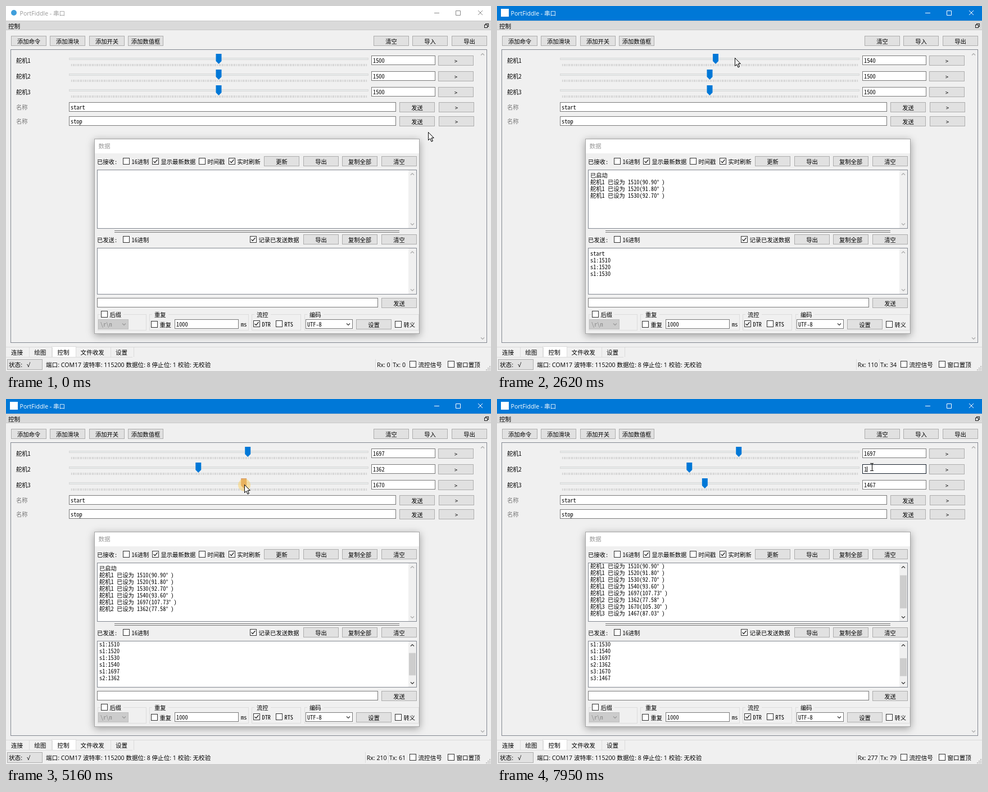
An HTML page with a canvas for the animation above (8000 ms loop, 863 px wide and 649 px high).

```html
<!DOCTYPE html>
<html lang="zh-CN">
<head>
<meta charset="utf-8">
<title>PortFiddle</title>
<style>
html, body { margin: 0; width: 100%; height: 100%; overflow: hidden; background: #f0f0f0; }
canvas { display: block; }
</style>
</head>
<body>
<canvas id="stage" width="863" height="649"></canvas>
<script>
const ctx = document.getElementById('stage').getContext('2d');
const LOOP = 8000, TICK = 81.8;
const MONO = '10.3px "Noto Sans Mono CJK SC", "Noto Sans CJK SC", monospace';
const UI = '10.6px "Open Sans", "Noto Sans CJK SC", sans-serif';
const BLUE = '#0078d7';
const PX_PER_UNIT = 0.2625;

// Events run from one step until another; a press lasts `hold` steps longer.
const move = (from, until, x, y) => ({ from, until, x, y });
const press = (from, hold) => ({ from, until: from, hold });
const drag = (from, until, servo, value) => ({ from, until, hold: 2, servo, value });
const pageClick = (_, i) => ({ ...press(22 + 3 * i, 1), servo: 0, value: 1510 + 10 * i });
const EVENTS = [
  move(1, 6, 735, 181), press(8, 1),
  move(11, 17, 311, 99), move(17, 19, 407, 97), move(19, 21, 423, 93),
  ...Array.from({ length: 4 }, pageClick),
  move(33, 36, 391, 94), drag(37, 41, 0, 1697),
  move(43, 46, 377, 119), drag(50, 52, 1, 1362),
  move(54, 56, 370, 142), move(56, 59, 379, 153), drag(60, 63, 2, 1670), drag(69, 72, 2, 1467),
  move(75, 79, 690, 126), move(80, 84, 661, 116), press(84, 2), move(86, 88, 667, 121)
];
const MESSAGES = [
  { at: 9, sent: 'start', reply: '已启动', rx: 11 },
  ...EVENTS.filter(e => e.value).map(({ until, hold, servo, value }) => {
    const angle = ((value - 500) * 0.09).toFixed(2);
    return {
      at: until + hold + 1,
      sent: `s${servo + 1}:${value}`,
      reply: `舵机${servo + 1} 已设为 ${value}(${angle}° )`,
      rx: 28 + angle.length
    };
  })
];

function stateAt(k) {
  const state = { x: 751, y: 225, down: false, values: [1500, 1500, 1500] };
  for (const e of EVENTS) {
    if (k < e.from) break;
    const f = e.until > e.from ? Math.min(1, (k - e.from) / (e.until - e.from)) : 1;
    if (e.x) {
      state.x += (e.x - state.x) * f;
      state.y += (e.y - state.y) * f;
    }
    if (e.value) {
      const delta = (e.value - state.values[e.servo]) * f ** 2.35;
      state.values[e.servo] += delta;
      if (e.until > e.from) state.x += delta * PX_PER_UNIT;
    }
    if (e.hold) state.down = k < e.until + e.hold;
  }
  state.x = Math.round(state.x);
  state.y = Math.round(state.y);
  return state;
}

function rect(x, y, w, h, fill) {
  ctx.fillStyle = fill;
  ctx.fillRect(x, y, w, h);
}
function box(x, y, w, h, fill, border) {
  rect(x, y, w, h, border);
  rect(x + 1, y + 1, w - 2, h - 2, fill);
}
function disc(x, y, r, fill) {
  ctx.fillStyle = fill;
  ctx.beginPath();
  ctx.arc(x, y, r, 0, 7);
  ctx.fill();
}
function text(s, x, y, { font = MONO, color = '#000', align = 'left' } = {}) {
  ctx.font = font;
  ctx.fillStyle = color;
  ctx.textAlign = align;
  ctx.fillText(s, x, y + 4);
}
function line(points, color, width = 1, close = false) {
  ctx.beginPath();
  points.forEach(([x, y]) => ctx.lineTo(x, y));
  if (close) ctx.closePath();
  ctx.strokeStyle = color;
  ctx.lineWidth = width;
  ctx.stroke();
}
function chevron(x, y, dir, color) {
  line([[x - 3, y - 1.5 * dir], [x, y + 1.5 * dir], [x + 3, y - 1.5 * dir]], color, 1.2);
}

let mouse;
const over = (x, y, w, h) => mouse.x >= x && mouse.x < x + w && mouse.y >= y && mouse.y < y + h;

function button(label, x, y, w = 63) {
  const hot = over(x, y, w, 18);
  const [fill, border] = !hot ? ['#e1e1e1', '#adadad'] : mouse.down ? ['#cce4f7', '#005499'] : ['#e5f1fb', BLUE];
  box(x, y, w, 18, fill, border);
  text(label, x + w / 2, y + 9.5, { align: 'center' });
}
function buttonRow(labels, x, y) {
  labels.forEach((s, i) => button(s, Math.round(x + i * 69.5), y));
}
function edit(value, x, y, w, focus = false) {
  box(x, y, w, 17, '#fff', focus ? '#17212d' : over(x, y, w, 17) ? '#171717' : '#7a7a7a');
  text(value, x + 3, y + 9);
}
function check(label, x, y, on = false, font = MONO) {
  box(x, y - 6, 12, 12, '#fff', '#333');
  if (on) line([[x + 2.5, y], [x + 5, y + 2.5], [x + 9.5, y - 3]], '#222', 1.2);
  text(label, x + 15.5, y + 0.5, { font });
}
function group(x, w, title) {
  box(x, 548, w, 29, '#f0f0f0', '#dcdcdc');
  rect(x + 5, 547, title ? 29 : 41, 4, '#f0f0f0');
  text(title, x + 9, 548.5);
}

function titleBar(active) {
  const c = active ? '#fff' : '#888';
  rect(0, 0, 863, 26, active ? BLUE : '#fff');
  if (active) rect(7, 5, 14, 14, '#fff');
  else disc(14, 12, 5, '#3f9fdc');
  text('PortFiddle - 串口', 24.5, 12.5, { font: UI, color: active ? '#fff' : '#999' });
  line([[762, 12.5], [771, 12.5]], c);
  line([[800.5, 8.5], [808.5, 8.5], [808.5, 16.5], [800.5, 16.5]], c, 1, true);
  line([[840, 8], [848, 16]], c);
  line([[848, 8], [840, 16]], c);
}

function slider(i, k) {
  const y = 97 + 28 * i, value = mouse.values[i];
  text('舵机' + (i + 1), 18, y);
  box(112, y - 5, 533, 4, '#e7eaea', '#d9d9d9');
  for (let t = 0; t <= 200; t++) rect(Math.round(116 + t * 2.625), y + 6, 1, 4, '#c6c6c6');
  const x = 378.5 + (value - 1500) * PX_PER_UNIT;
  const hot = over(x - 5, y - 12, 10, 17);
  ctx.fillStyle = !hot ? BLUE : mouse.down ? '#d8a070' : '#171723';
  ctx.beginPath();
  [[-5, -12], [5, -12], [5, 1], [0, 6], [-5, 1]].forEach(([dx, dy]) => ctx.lineTo(x + dx, y + dy));
  ctx.fill();

  const focus = i === 1 && k >= 84, retyped = k >= 97;
  edit(focus && retyped ? '1' : Math.round(value), 650, y - 9, 114, focus);
  if (focus && (k < 91 || retyped)) rect(retyped ? 658 : 673, y - 5, 1, 10, '#000');
  button('>', 769, y - 9);
}

function mainPanel(k) {
  box(-1, 26, 865, 17, '#dadada', '#c8c8c8');
  text('控制', 4, 35.5, { font: UI });
  box(853, 31, 6, 6, '#dadada', '#222');
  box(851, 33, 6, 6, '#dadada', '#222');
  buttonRow(['添加命令', '添加滑块', '添加开关', '添加数值框'], 8.5, 53);
  buttonRow(['清空', '导入', '导出'], 653.5, 53);
  box(8, 77, 848, 522, '#f0f0f0', '#828790');
  chevron(848, 86, -1, '#aaa');
  chevron(848, 591, 1, '#aaa');
  for (let i = 0; i < 3; i++) slider(i, k);
  ['start', 'stop'].forEach((s, i) => {
    const y = 171 + 25 * i;
    text('名称', 18, y + 9, { color: '#787878' });
    edit(s, 112, y, 582);
    buttonRow(['发送', '>'], 700, y);
  });
}

function log(lines, y, h) {
  const n = lines.length, page = (h - 11) / 12, room = Math.round(page);
  const offset = n > room ? 12 * (n - room) + 4 : 0;
  const full = n >= room, arrow = full ? '#333' : '#aaa';
  box(162, y, 569, h, '#fff', '#828790');
  rect(716, y + 1, 14, h - 2, '#f0f0f0');
  ctx.save();
  ctx.beginPath();
  ctx.rect(163, y + 1, 553, h - 2);
  ctx.clip();
  lines.forEach((s, i) => text(s, 166, y + 9.5 + i * 12 - offset));
  ctx.restore();
  if (full) {
    const lineSize = (h - 30) / (n + 1);
    rect(717, y + 15 + Math.max(0, offset - 4) / 12 * lineSize, 12, page * lineSize, '#cdcdcd');
  }
  chevron(723, y + 8, -1, arrow);
  chevron(723, y + h - 8, 1, arrow);
}

function dataWindow(sent, received) {
  ctx.save();
  ctx.shadowColor = 'rgba(0,0,0,.36)';
  ctx.shadowBlur = 13;
  ctx.shadowOffsetY = 3;
  rect(157, 236, 579, 347, '#aaa');
  ctx.restore();
  box(157, 236, 579, 347, '#f0f0f0', '#a6a6a6');
  rect(158, 237, 577, 25, '#fff');
  text('数据', 164.5, 249, { font: UI, color: '#999' });

  text('已接收:', 162, 276.5);
  check('16进制', 208, 276);
  check('显示最新数据', 260, 276, true);
  check('时间戳', 343, 276);
  check('实时刷新', 396, 276, true);
  buttonRow(['更新', '导出', '复制全部', '清空'], 459, 267);
  log(received, 291, 105);
  rect(193, 399, 507, 1, '#777');
  rect(193, 402, 507, 1, '#777');

  text('已发送:', 162, 415.5);
  check('16进制', 208, 415);
  check('记录已发送数据', 434, 415, true);
  buttonRow(['导出', '复制全部', '清空'], 528.5, 406);
  log(sent, 430, 83);
  edit('', 162, 519, 500);
  button('发送', 668, 519);

  group(163, 87, '');
  check('后缀', 169, 548);
  box(164, 557, 54, 18, '#ccc', '#bfbfbf');
  text('\\r\\n', 168, 566, { color: '#838383' });
  chevron(210, 566, 1, '#999');
  group(255, 177, '重复');
  check('重复', 258, 566);
  edit('1000', 300, 557, 114);
  text('ms', 418, 566);
  group(437, 88, '流控');
  check('DTR', 440, 565, true);
  check('RTS', 480, 565);
  group(531, 204, '编码');
  edit('UTF-8', 533, 557, 84);
  chevron(609, 566, 1, '#333');
  button('设置', 623, 557);
  check('转义', 692, 566);
}

function footer(rx, tx) {
  rect(0, 606, 863, 1, '#d9d9d9');
  rect(0, 624, 225, 1, '#dcdcdc');
  box(81, 605, 44, 20, '#fff', '#dcdcdc');
  let x = 9;
  for (const label of ['连接', '绘图', '控制', '文件收发', '设置']) {
    text(label, x, 615.5, { font: UI });
    x += ctx.measureText(label).width + 20;
    rect(Math.round(x - 9), 607, 1, 17, '#dcdcdc');
  }
  box(2, 628, 63, 19, '#e1e1e1', '#adadad');
  text('状态:', 5, 637.5, { font: UI });
  text('√', 37, 637.5, { font: UI });
  text('端口: COM17 波特率: 115200 数据位: 8 停止位: 1 校验: 无校验', 71, 637.5, { font: UI });
  let right = 711;
  for (const label of ['Tx: ' + tx, 'Rx: ' + rx]) {
    text(label, right, 637.5, { font: UI, align: 'right' });
    right -= ctx.measureText(label).width + 4.5;
    rect(Math.round(right + 2), 628, 1, 19, '#dadada');
  }
  check('流控信号', 718, 637, false, UI);
  check('窗口置顶', 786, 637, false, UI);
  for (let i = 0; i < 3; i++)
    for (let j = 0; j <= i; j++) rect(860 - 3 * j, 640 + 3 * i, 2, 2, '#bfbfbf');
}

function pointer() {
  const { x, y, down } = mouse;
  if (down) disc(x, y, 11, 'rgba(255,202,70,.42)');
  if (over(650, 116, 114, 17)) {
    for (const end of [y - 6.5, y + 6.5]) line([[x - 3, end], [x + 3, end]], '#000');
    rect(x, y - 6, 1, 13, '#000');
    return;
  }
  const shape = [[0, 0], [0, 14], [3.2, 11.2], [5.6, 16.5], [7.8, 15.5], [5.4, 10.3], [9.6, 10]]
    .map(([dx, dy]) => [x + 0.5 + dx, y - 0.5 + dy]);
  line(shape, '#000', 1, true);
  ctx.fillStyle = '#fff';
  ctx.fill();
  line(shape, '#000', 0.9, true);
}

function draw(now) {
  const k = Math.floor(now % LOOP / TICK);
  mouse = stateAt(k);
  const sent = MESSAGES.filter(m => k >= m.at), received = MESSAGES.filter(m => k > m.at);
  rect(0, 0, 863, 649, '#f0f0f0');
  titleBar(k >= 8);
  mainPanel(k);
  dataWindow(sent.map(m => m.sent), received.map(m => m.reply));
  footer(received.reduce((n, m) => n + m.rx, 0), sent.reduce((n, m) => n + m.sent.length + 2, 0));
  pointer();
  requestAnimationFrame(draw);
}
requestAnimationFrame(draw);
</script>
</body>
</html>
```
